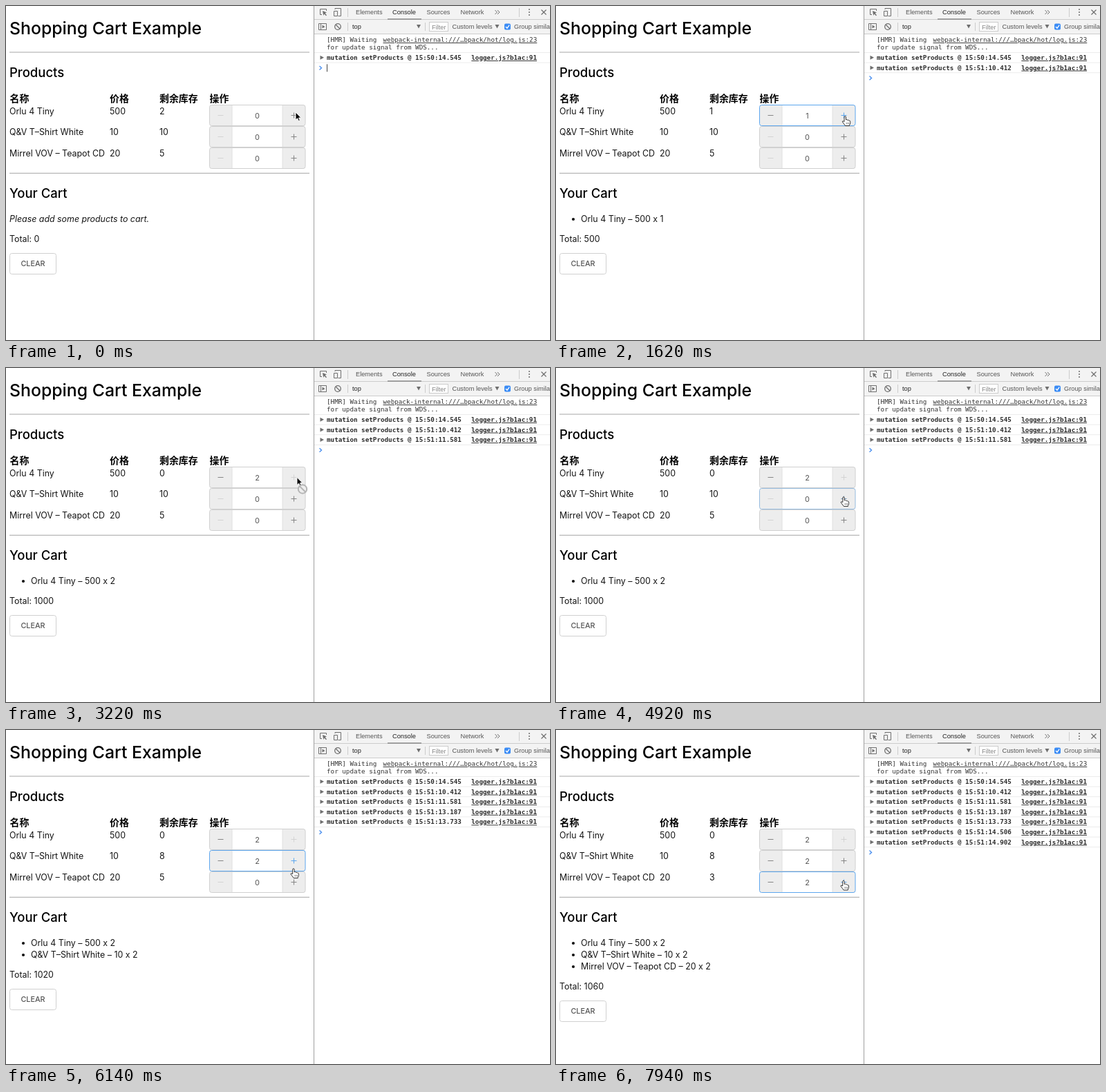
An HTML page for the animation above (8000 ms loop, 787 by 484 pixels).

```html
<!DOCTYPE html>
<html lang="en">
<head>
<meta charset="utf-8">
<title>Shopping Cart Example</title>
<style>
  html, body { margin: 0; width: 100%; height: 100%; overflow: hidden; background: #fff; }
  svg { display: block; width: 100%; height: 100%; }
  text { font: 12.4px Inter, sans-serif; fill: #151515; }
  .h1 { font-size: 24.8px; font-weight: 500; fill: #000; }
  .h2 { font-size: 18.5px; font-weight: 500; fill: #000; }
  .th { font: bold 13.9px "Noto Sans CJK SC", "Noto Sans CJK", sans-serif; fill: #000; }
  .italic { font-style: italic; }
  .count { font-size: 11px; fill: #555; text-anchor: middle; }
  .button { font-size: 10.8px; font-weight: 500; fill: #555; text-anchor: middle; }
  .ui { font: 9.25px "Liberation Sans", Arial, sans-serif; fill: #555; }
  .active { fill: #222; }
  .hint { fill: #858585; }
  .mono { font: 9.25px "DejaVu Sans Mono", monospace; fill: #333; }
  .log { font-weight: bold; fill: #2c2c2c; }
  .link { text-decoration: underline; }
</style>
</head>
<body>
<svg viewBox="0 0 787 484"><g id="fixed"></g><g id="live"></g></svg>
<script>
const LOOP = 8000;
const BLUE = [92, 166, 238];
const BOX_TOP = 143.5, BOX_STEP = 31, BOX_HEIGHT = 30;
const LOG_STEP = 14.6;

const products = [
  { name: 'Orlu 4 Tiny', price: 500, stock: 2, hover: [220, 2720] },
  { name: 'Q&amp;V T–Shirt White', price: 10, stock: 10, hover: [4820, 6180] },
  { name: 'Mirrel VOV – Teapot CD', price: 20, stock: 5, hover: [6180, 9000] },
];

const clicks = [
  { at: 1020, row: 0, stamp: '15:51:10.412' },
  { at: 2720, row: 0, stamp: '15:51:11.581' },
  { at: 5140, row: 1, stamp: '15:51:13.187' },
  { at: 5940, row: 1, stamp: '15:51:13.733' },
  { at: 7040, row: 2, stamp: '15:51:14.506' },
  { at: 7640, row: 2, stamp: '15:51:14.902' },
];

// time, x, y of the pointer's hot spot
const pointerPath = [
  [20, 419, 154], [820, 417, 160], [1520, 417, 160], [1820, 422, 160],
  [2720, 422, 160], [3120, 421, 158.5], [4600, 421, 158.5], [4960, 416, 188],
  [5960, 416, 188], [6360, 416, 218.5],
];

const clamp = v => Math.min(1, Math.max(0, v));
const mix = (a, b, p) => a + (b - a) * p;
const blend = (from, to, p) => `rgb(${from.map((v, i) => Math.round(mix(v, to[i], p)))})`;
const rowBaseline = i => 156.7 + i * 30.7;
const text = (x, y, cls, str) => `<text x="${x}" y="${y}" class="${cls}">${str}</text>`;
const path = (d, stroke, width = 1, fill = 'none') =>
  `<path d="${d}" stroke="${stroke}" stroke-width="${width}" fill="${fill}"/>`;
const rect = (x, y, w, h, fill, stroke = 'none', r = 0) =>
  `<rect x="${x}" y="${y}" width="${w}" height="${h}" rx="${r}" fill="${fill}" stroke="${stroke}"/>`;
const circle = (x, y, r, fill, stroke = 'none', width = 1) =>
  `<circle cx="${x}" cy="${y}" r="${r}" fill="${fill}" stroke="${stroke}" stroke-width="${width}"/>`;
const place = (x, y, body) => `<g transform="translate(${x} ${y})">${body}</g>`;

function page() {
  return text(5, 41, 'h1', 'Shopping Cart Example')
    + path('M5 67H439M5 242.3H439', '#a5a5a5')
    + text(5, 103, 'h2', 'Products')
    + text(5.5, 138.5, 'th', '名称') + text(150, 138.5, 'th', '价格')
    + text(222, 138.5, 'th', '剩余库存') + text(294.5, 138.5, 'th', '操作')
    + products.map((p, i) => text(5, rowBaseline(i), '', p.name)
      + text(150, rowBaseline(i), '', p.price)).join('')
    + text(5, 278, 'h2', 'Your Cart');
}

function devtools() {
  const gray = '#6e6e6e';
  const arrowDown = x => path(`M${x - 3} 27h6l-3 5.5z`, 'none', 0, gray);
  return rect(446, 0, 341, 40, '#f3f3f3')
    + path('M446 19.5H787M446 40.5H787', '#ccc')
    + path('M552 19H601', '#8a8a8a', 1.4)
    + path('M445.5 0V484', '#a0a0a0')
    + path('M494.5 3V16M742.5 3V16M494.5 24V36M606.5 24V36', '#ccc')
    // inspect and device icons
    + path('M457 12.5H454.5V4.5H463.5V7', gray)
    + path('M458 7l6 2.6-2.4 1 2.4 2.6-1 1-2.5-2.6-1.2 2.3z', 'none', 0, gray)
    + path('M476 5V3.5H484.5V14.5H480.5M474.5 7.5H479.5V14.5H474.5Z', gray)
    // sidebar and clear icons
    + path('M452.5 25.5H463.5V34.5H452.5ZM455.5 25.5V34.5', gray)
    + path('M457.5 27.5l4 2.5-4 2.5z', 'none', 0, gray)
    + circle(480, 30, 4.3, 'none', gray, 1.3) + path('M477 27l6 6', gray, 1.3)
    + text(506, 12.3, 'ui', 'Elements') + text(559, 12.3, 'ui active', 'Console')
    + text(608.5, 12.3, 'ui', 'Sources') + text(657.5, 12.3, 'ui', 'Network')
    + path('M707.5 6l3 3-3 3M711 6l3 3-3 3', gray)
    + [5, 9, 13].map(y => circle(757, y, 1, gray)).join('')
    + path('M774.5 5.5l7 7M781.5 5.5l-7 7', gray, 1.2)
    + text(501, 33, 'ui active', 'top') + arrowDown(597)
    + rect(612.5, 23.5, 27, 13, '#fff', '#ccc') + text(616, 33.5, 'ui hint', 'Filter')
    + text(645.5, 33, 'ui', 'Custom levels') + arrowDown(710.5)
    + rect(721, 25.5, 9, 9, '#3b8cf5', 'none', 2) + path('M723 30l2 2.2 3.2-4.6', '#fff', 1.3)
    + text(735, 33, 'ui', 'Group similar')
    + text(464, 52, 'mono', '[HMR] Waiting')
    + text(545.5, 52, 'mono link', 'webpack-internal:///…bpack/hot/log.js:23')
    + text(464, 63, 'mono', 'for update signal from WDS...')
    + path('M446 67.5H787', '#ececec');
}

function stepper(i, count, left, hover) {
  const y = BOX_TOP + i * BOX_STEP, mid = y + BOX_HEIGHT / 2 + 0.5;
  const border = blend([208, 208, 208], BLUE, hover);
  const minus = count ? '#858585' : '#d3d3d3';
  const plus = left ? blend([133, 133, 133], BLUE, hover) : '#d3d3d3';
  return rect(294.5, y, 138.5, BOX_HEIGHT, '#ededed', 'none', 3)
    + rect(327, y, 73, BOX_HEIGHT, '#fff')
    + path(`M327 ${y}v${BOX_HEIGHT}M400 ${y}v${BOX_HEIGHT}`, '#e0e0e0')
    + rect(294.5, y, 138.5, BOX_HEIGHT, 'none', border, 3)
    + path(`M306.5 ${mid - 0.5}h8`, minus)
    + path(`M412.5 ${mid - 0.5}h8M416.5 ${mid - 4.5}v8`, plus)
    + text(363.5, mid + 3.7, 'count', count);
}

function cart(counts) {
  const items = products.map((p, i) => ({ ...p, count: counts[i] })).filter(p => p.count);
  const total = items.reduce((sum, p) => sum + p.price * p.count, 0);
  const shift = 17 * Math.max(0, items.length - 1);
  const list = items.map((p, i) => circle(25, 309 + 17 * i, 2.1, '#111')
    + text(36, 313 + 17 * i, '', `${p.name} – ${p.price} x ${p.count}`)).join('');
  return (list || text(5, 313, 'italic', 'Please add some products to cart.'))
    + text(5, 342 + shift, '', `Total: ${total}`)
    + rect(5.5, 358.5 + shift, 67, 30, '#fff', '#d0d0d0', 3)
    + text(39, 377.3 + shift, 'button', 'CLEAR');
}

function consoleLog(stamps, caret) {
  const rows = stamps.map((stamp, i) => {
    const y = 74.8 + i * LOG_STEP;
    return path(`M454.5 ${y - 3}l5.5 3-5.5 3z`, 'none', 0, '#6e6e6e')
      + text(464, y + 3.2, 'mono log', `mutation setProducts @ ${stamp}`)
      + text(673.3, y + 3.2, 'mono log link', 'logger.js?b1ac:91')
      + path(`M446 ${y + 7.3}H787`, '#ececec');
  }).join('');
  const y = 75.2 + stamps.length * LOG_STEP;
  return rows + path(`M453.5 ${y - 2.8}l3 2.8-3 2.8`, '#4a8fee', 1.4)
    + (caret ? path(`M464.5 ${y - 5.5}v11`, '#444') : '');
}

function pointerAt(t) {
  const next = pointerPath.findIndex(k => k[0] > t);
  if (next === 0) return pointerPath[0].slice(1);
  if (next < 0) return pointerPath[pointerPath.length - 1].slice(1);
  const [t0, x0, y0] = pointerPath[next - 1], [t1, x1, y1] = pointerPath[next];
  const p = (t - t0) / (t1 - t0), eased = p * p * (3 - 2 * p);
  return [mix(x0, x1, eased), mix(y0, y1, eased)];
}

function pointer(t) {
  const [x, y] = pointerAt(t);
  const blocked = t >= 2720 && t < 4780;
  const arrow = path('M0 0V11L2.6 8.7 4.4 12.6 6.2 11.8 4.5 8H7.8Z', '#fff', 0.9, '#000');
  const ban = circle(8, 17, 6.2, '#eee', '#b5b5b5', 2) + path('M4 13l8 8', '#b5b5b5', 2);
  const hand = path('M-1.3 7.5V1a1.2 1.2 0 0 1 2.4 0V4.8q1.9-.8 2.4.6 1.7-.6 2.2.7 1.6-.2 1.7 1.4V9.5'
    + 'q0 1.5-1.2 3V13.5H.2Q-1.5 11-3.8 8.2q-.6-1.7.9-1.4Z', '#222', 0.9, '#fff')
    + path('M1.9 8.8v2.6M3.7 8.8v2.6M5.4 8.8v2.6', '#222', 0.5);
  const pressed = clicks.some(c => t >= c.at - 110 && t < c.at);
  return place(x, y, blocked ? arrow + ban : t < 220 ? arrow : hand)
    + (pressed ? circle(x + 0.3, y - 0.3, 23.5, 'none', '#111', 1.2) : '');
}

function draw(t) {
  const done = clicks.filter(c => t >= c.at);
  const counts = products.map((_, i) => done.filter(c => c.row === i).length);
  const rows = products.map((p, i) => {
    const [from, to] = p.hover, left = p.stock - counts[i];
    const hover = clamp((t - from) / 200) - clamp((t - to) / 200);
    return text(222, rowBaseline(i), '', left) + stepper(i, counts[i], left, hover);
  }).join('');
  return rows + cart(counts)
    + consoleLog(['15:50:14.545', ...done.map(c => c.stamp)], t < 420)
    + pointer(t);
}

document.getElementById('fixed').innerHTML = page() + devtools();
const live = document.getElementById('live');
let shown = '';
function tick() {
  const markup = draw(performance.now() % LOOP);
  if (markup !== shown) live.innerHTML = shown = markup;
  requestAnimationFrame(tick);
}
tick();
</script>
</body>
</html>
```
